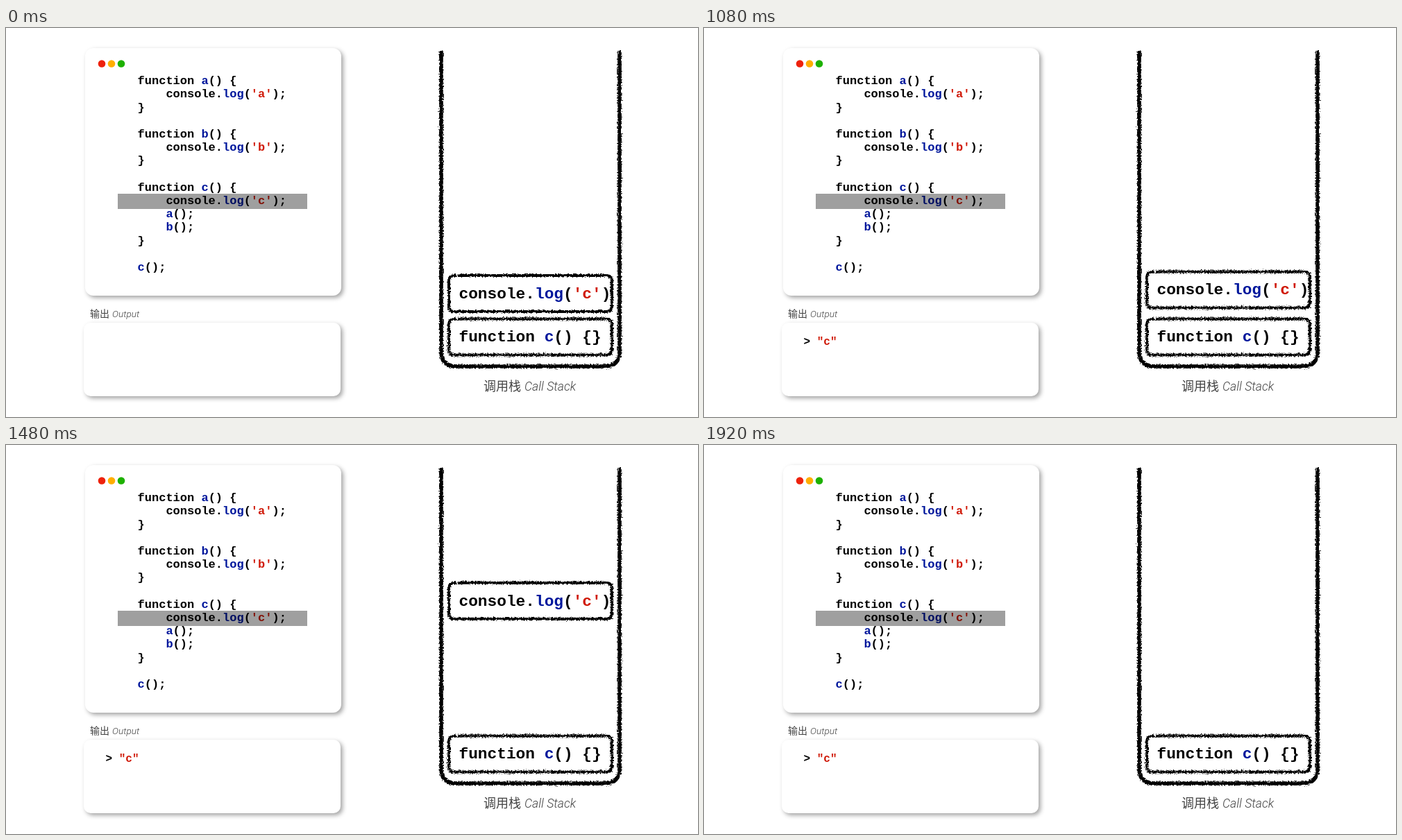
Recreate the animation shown at these times as an HTML page. Size 997x561 px, loop 2.44 s.

```html
<!DOCTYPE html>
<html lang="zh">
<head>
<meta charset="utf-8">
<title>Call Stack</title>
<style>
  html, body { margin: 0; width: 100%; height: 100%; overflow: hidden; background: #fff; }
  svg { display: block; }
  .card { fill: #fff; filter: drop-shadow(3px 3px 3px rgba(0, 0, 0, .36)); }
  .code { font: bold 17px "Liberation Mono", monospace; white-space: pre; }
  .big { font-size: 22.8px; }
  .out { font-size: 16px; }
  .name { fill: #00179c; }
  .str { fill: #d01a08; }
  .label { font: 300 14px "Noto Sans CJK SC", "Noto Sans CJK", sans-serif; fill: #444; }
  .label tspan { font-family: Roboto, "Liberation Sans", sans-serif; font-style: italic; }
  .rough { fill: none; stroke: #000; filter: url(#rough); }
</style>
</head>
<body>
<svg width="997" height="561" viewBox="0 0 997 561">
  <defs>
    <filter id="rough" filterUnits="userSpaceOnUse" x="610" y="15" width="290" height="490" color-interpolation-filters="sRGB">
      <feTurbulence type="fractalNoise" baseFrequency=".5" numOctaves="2" seed="4"/>
      <feDisplacementMap in="SourceGraphic" scale="6" xChannelSelector="R" yChannelSelector="G"/>
    </filter>
    <path id="frame" class="rough" stroke-width="4" d="M651 357H865q8 0 8 8V401q0 8-8 8H646q-8 0-8-8V365q0-8 8-8h3"/>
  </defs>

  <rect class="card" x="114" y="29" width="369" height="357" rx="12"/>
  <circle cx="138" cy="51.5" r="5.3" fill="#ee220c"/>
  <circle cx="152" cy="51.5" r="5.3" fill="#ffae00"/>
  <circle cx="166" cy="51.5" r="5.3" fill="#1db100"/>
  <g id="source"></g>
  <rect x="161" y="239" width="273" height="22" fill="#000" opacity=".375"/>

  <text class="label" x="121" y="417">输出<tspan x="153" font-size="13.6">Output</tspan></text>
  <rect class="card" x="112" y="425" width="370" height="106" rx="10"/>
  <g id="output"></g>

  <path class="rough" stroke-width="5.6" d="M627 33V466Q627 488 649 488H862Q884 488 884 466V33"/>
  <g id="lower" transform="translate(0 62.5)"><use href="#frame"/></g>
  <g id="upper"><use href="#frame"/></g>
  <text class="label" x="688" y="523" style="font-size:18px">调用栈<tspan x="747" font-size="17.6">Call Stack</tspan></text>
</svg>
<script>
const LOOP = 2440, STEP = 40;
const $ = id => document.getElementById(id);
const clamp = v => Math.min(1, Math.max(0, v));

const paint = s => s.replace(/('.*?'|".*?")|(\blog|\b[abc](?=\())/g,
  (m, str) => `<tspan class="${str ? 'str' : 'name'}">${m}</tspan>`);
const write = (id, x, y, text, size = '') =>
  $(id).insertAdjacentHTML('beforeend', `<text class="code ${size}" x="${x}" y="${y}">${paint(text)}</text>`);

const program = `function a() {
    console.log('a');
}

function b() {
    console.log('b');
}

function c() {
    console.log('c');
    a();
    b();
}

c();`;
program.split('\n').forEach((line, i) => {
  const code = line.trimStart();
  write('source', 189.6 + (line.length - code.length) * 10.2, 81.2 + i * 19.2, code);
});
write('output', 143.5, 457, '&gt; "c"', 'out');
write('upper', 652.5, 389.7, "console.log('c')", 'big');
write('lower', 652.5, 389.7, 'function c() {}', 'big');

function draw(now) {
  const t = Math.floor(now % LOOP / STEP) * STEP;
  // The printed line fades in, then the finished call leaves the stack.
  $('output').setAttribute('opacity', t < 640 ? 0 : clamp((t - 630) / 370));
  const lift = 517 * (1 - Math.cos(Math.PI * clamp((t - 995) / 1300))) / 2;
  $('upper').setAttribute('transform', `translate(0 ${-lift})`);
}

const start = performance.now();
function tick() {
  draw(performance.now() - start);
  requestAnimationFrame(tick);
}
tick();
</script>
</body>
</html>
```
